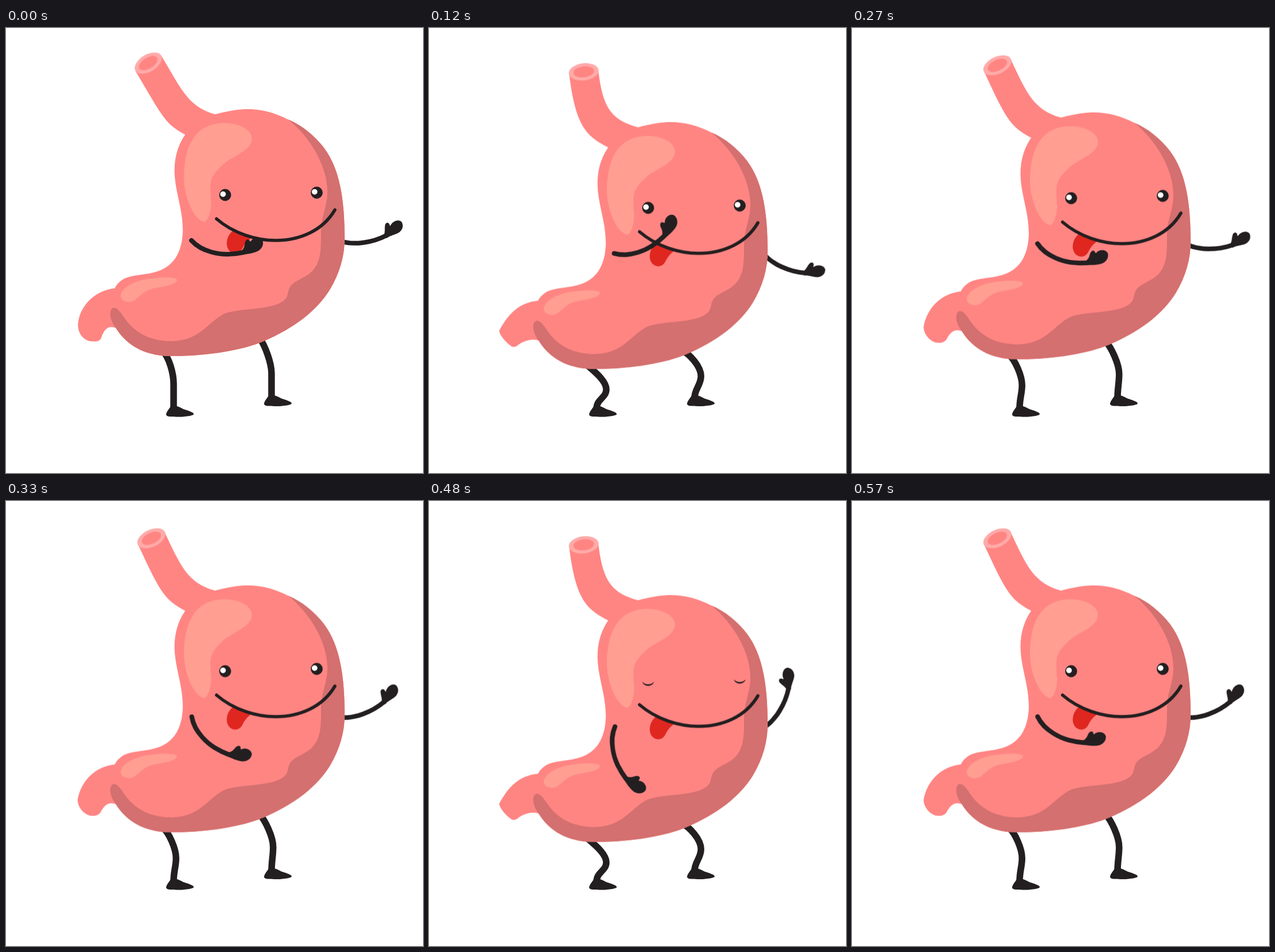
Recreate the animation shown at these times as an HTML page. Size 724 px wide and 773 px high, loop 600 ms.

```html
<!DOCTYPE html>
<html lang="en">
<head>
<meta charset="utf-8">
<title>Dancing stomach</title>
<style>
  html, body { margin: 0; width: 100%; height: 100%; overflow: hidden; background: #fff; }
  svg { display: block; width: 100%; height: 100%; }

  .flesh { fill: #ff8583; }
  .shade { fill: #d4706f; }
  .shine { fill: #ff9e91; }
  .rim { fill: #ffaaa9; }
  .ink { fill: #231f20; }
  .line { fill: none; stroke: #231f20; stroke-linecap: round; }

  /* Every move advances in 30 ms ticks: five per 150 ms segment. */
  .bob, .neck, .mouth-ring, .tail, .leg-front, .leg-back {
    animation: 300ms steps(5) -4ms infinite;
  }
  .arm-front, .arm-back { animation: 600ms steps(5) -4ms infinite; }

  .bob { animation-name: bob; }
  @keyframes bob {
    0%, 100% { transform: translateY(0); }
    50% { transform: translateY(28px); }
  }

  .neck { animation-name: neck; }
  @keyframes neck {
    0%, 100% { d: path("M224.7 74.4 C273 156 276 166 311 185 L345 195 L363 150 C315 137 303 103 269.3 47.6 Z"); }
    50% { d: path("M248 52.5 C250 152 276 166 311 185 L345 195 L363 150 C315 137 301 116.5 300 51.5 Z"); }
  }

  .mouth-ring { animation-name: ring; }
  @keyframes ring {
    0%, 100% { transform: translate(247px, 61px) rotate(-31deg); }
    50% { transform: translate(274px, 52px) rotate(-1deg); }
  }

  .tail { animation-name: tail; }
  @keyframes tail {
    0%, 100% { d: path("M190 452 C150 456 125 488 125 518 C126 530 132 540 145 544 C156 545 162 545 165 539 C170 524 177 516 190 521 L215 490 Z"); }
    50% { d: path("M190 451 C169 453 147 458 121 500 C122 506 132 519 144 528 C152 530 152 523 161 520 C172 518 181 518 190 520 L215 490 Z"); }
  }

  .leg-front { animation-name: leg-front; }
  @keyframes leg-front {
    0%, 100% { d: path("M271 560 C284 572 291 602 291 618 C291 633 291 642 291 661"); }
    50% { d: path("M271 588 C284 600 312 614 312 630 C312 645 291 645 291 661"); }
  }

  .leg-back { animation-name: leg-back; }
  @keyframes leg-back {
    0%, 100% { d: path("M440 538 C450 552 461 582 461 600 C461 615 461 626 461 643"); }
    50% { d: path("M440 566 C452 570 475 588 475 606 C475 622 461 627 461 643"); }
  }

  .arm-front { transform-origin: 322px 370px; animation-name: arm-front; }
  @keyframes arm-front {
    0%, 100% { transform: rotate(0deg); }
    25% { transform: rotate(-40.4deg); }
    50% { transform: rotate(20.3deg); }
    75% { transform: rotate(81.3deg); }
  }

  .arm-back { transform-origin: 582px 369px; animation-name: arm-back; }
  @keyframes arm-back {
    0%, 50%, 100% { transform: rotate(0deg); }
    25% { transform: rotate(40deg); }
    75% { transform: rotate(-64deg); }
  }

  .open, .closed { animation: blink 600ms step-end -4ms infinite; }
  .open { --rest: 1; --shut: 0; }
  .closed { --rest: 0; --shut: 1; }
  @keyframes blink {
    0%, 85%, 100% { opacity: var(--rest); }
    65% { opacity: var(--shut); }
  }
</style>
</head>
<body>
<svg viewBox="0 0 724 773">
  <defs>
    <path id="foot" class="ink" d="M286 657 C296 655 300 658 308 662 C316 665 326 667 326 671 C324 674 306 676 296 675.5 C288 675 280 676 278 672 C278 667 283 662 286 657 Z"/>
    <g id="eye">
      <circle class="ink" r="10.4"/>
      <circle cx="-3.7" cy="-1.4" r="4.9" fill="#fff"/>
    </g>
    <path id="lid" class="ink" d="M-10 1.5 C-8.5 11 8.5 11 10 1.5 C5.5 7.5 -5.5 7.5 -10 1.5 Z"/>
  </defs>

  <path class="line leg-front" stroke-width="11.5" style="stroke-linecap:butt"/>
  <path class="line leg-back" stroke-width="11.5" style="stroke-linecap:butt"/>
  <use href="#foot"/>
  <use href="#foot" x="170" y="-18.6"/>

  <g class="bob">
    <g class="arm-back">
      <path class="line" stroke-width="8" d="M582 370.5 C602 377 635 374 661 360"/>
      <path class="ink" d="M655 362 C659 356 657 348 658 343 C659 337 665 337 666 342 L667 344 C671 335 682 331 687 337 C692 346 686 354 679 357 C672 360 666 361 661 365 Z"/>
    </g>

    <path class="flesh tail"/>
    <path class="flesh neck"/>
    <g class="mouth-ring">
      <ellipse class="rim" rx="26" ry="15"/>
      <ellipse class="flesh" rx="18" ry="9.4"/>
    </g>

    <path class="flesh" d="M311 185 C296 207 291 232 293 258 C296 292 307 316 307 352 C306 390 291 414 262 423 C240 430 215 428 201 438 C192 445 190 449 188 455 L182 490 L190 520 C206 546 232 566 275 569.5 C340 572 410 560 445 545 C502 521 540 490 562 455 C580 425 588 395 588 365 C588 300 580 245 552 208 C536 187 514 169 490 159 C465 146 440 140 415 141 C395 142 378 146 363 150 Z"/>
    <path class="shade" d="M190 520 C206 546 232 566 275 569.5 C340 572 410 560 445 545 C502 521 540 490 562 455 C580 425 588 395 588 365 C588 300 580 245 552 208 C536 187 514 169 490 159 C528 189 558 240 558 284 C558 312 547 325 547 356 C547 390 546 406 532 422 C518 436 500 438 493 450 C488 459 491 466 483 473 C462 491 405 486 380 496 C350 510 338 544 285 544 C250 543 225 530 208 507 C200 496 195 486 187 486 C180 487 177 502 190 520 Z"/>
    <path class="shine" d="M380 165 C405 165 427 177 427 192 C427 214 392 222 376 238 C352 260 354 268 356 300 C357 320 349 337 344 337 C325 333 309 290 309 262 C309 205 328 165 380 165 Z"/>
    <path class="shine" d="M297 438 C297 430 250 433 232 439 C212 445 199 456 199 466 C201 476 214 478 222 474 C235 464 240 456 258 452 C275 449 295 446 297 438 Z"/>

    <g class="open">
      <use href="#eye" x="380.5" y="290"/>
      <use href="#eye" x="539.5" y="286"/>
    </g>
    <g class="closed">
      <use href="#lid" x="380.5" y="290"/>
      <use href="#lid" x="539.5" y="286"/>
    </g>
    <path fill="#df2720" d="M394 352 C384 360 382 372 384 380 C388 393 403 396 410 384 C414 376 418 370 427 364 Z"/>
    <path class="line" stroke-width="5.5" d="M365.5 331.5 C395 357 435 369 468 369 C510 369 550 352 571 316"/>

    <g class="arm-front">
      <path class="line" stroke-width="8" d="M322 369 C337 386 370 399 411 390"/>
      <path class="ink" d="M407 388 C414 384 414 378 415 372 C417 366 422 366 423 370 L425 371 C428 364 440 361 445 368 C449 377 443 386 434 389 C425 392 416 393 411 394 Z"/>
    </g>
  </g>
</svg>
</body>
</html>
```
